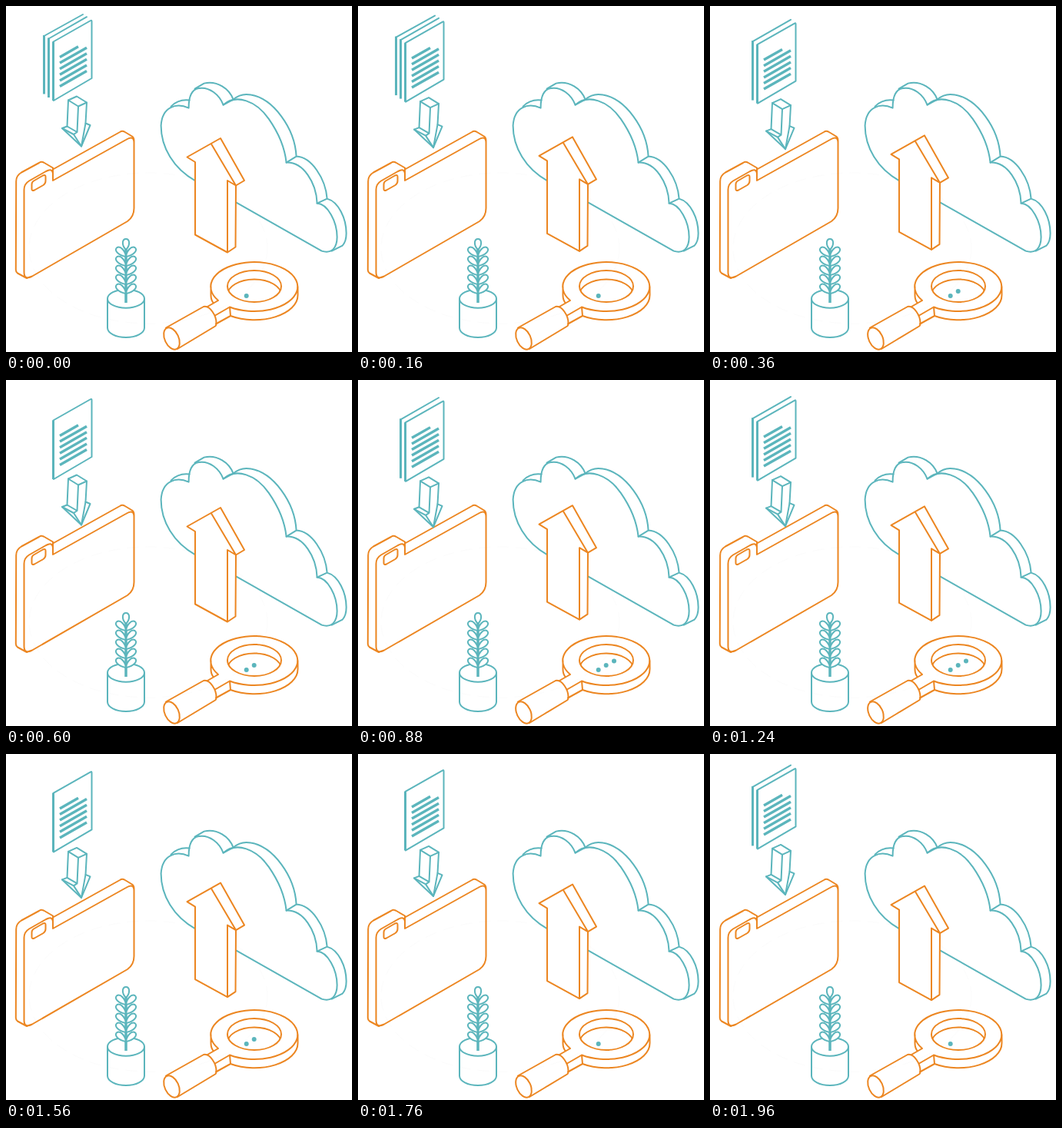
These frames come from a looping animation (450x450 px, 2000 ms). An HTML page:

```html
<!DOCTYPE html>
<html lang="en">
<head>
<meta charset="utf-8">
<title>Cloud upload</title>
<style>
  html, body { margin: 0; width: 100%; height: 100%; overflow: hidden; background: #fff; }
  svg { display: block; width: 100%; height: 100%; fill: none; stroke-width: 2; stroke-linejoin: round; stroke-linecap: round; }
  .teal { stroke: #5bb5bc; }
  .orange { stroke: #ec8621; }
  .solid { fill: #fff; }
  .thick { stroke-width: 3; stroke-linecap: butt; }
  .dot { fill: #5bb5bc; stroke: none; }
</style>
</head>
<body>
<svg viewBox="0 0 450 450">
  <defs>
    <clipPath id="lens"><ellipse cx="323" cy="364.5" rx="35" ry="20.5"/></clipPath>
  </defs>

  <ellipse cx="185" cy="315" rx="155" ry="98" stroke="#fcfcfc" stroke-width="1" stroke-dasharray="14 10"/>

  <!-- cloud -->
  <g class="teal" transform="translate(.6 .6)">
    <path d="M246 227C217 211 201 183 201 155C202.500 130 221 125 237 132C237 117 241 108 250 106.500C264 104 277 115 282 128C299 113 325 123 341 146C355 166 362 184 364 203C386 202 403 229 404 256C418 257 430 280 430 300C430 314 423 322 410 318L299 255"/>
    <path d="M214 130C221 123 230 121 238 122M245 107L257 100C274 96 290 107 295 121M282 128L295 121C302 115 309 113 318 115C347 120 375 158 377 195L364 203M377 195C397 196 415 224 417 250L404 256M417 250C432 254 442 276 442 295C442 303 440 308 437 311L423 318"/>
  </g>

  <!-- upload arrow -->
  <g id="up" class="orange">
    <path class="solid" d="M235.500 196.500L279 172L310 227L299 233.500L298.500 313.500L288 320.500L246 297.500V203Z"/>
    <path d="M267 179.500L299 233.500L288 227V320"/>
  </g>

  <!-- folder -->
  <g class="orange">
    <path d="M31 352.500L27 354L15 347.500Q12.800 346 12.800 343L13.200 228Q13.200 220.500 20 216.500L43 204Q46 202 49 203.500L61 210.500V227L156 174Q166.500 167.500 166.500 178M61 212.500L148 164Q151 162 154 163.500L164 169.500Q166.500 171 166.500 175V263Q166.500 274 158 280L34 351.500Q23.500 357 23.500 346V239Q23.500 231.500 30 227.500L52 215Q60.500 210.500 61 218"/>
    <path d="M36 227.500L48 220.500Q51.500 219 51.500 222V227.500Q51.500 231 48.500 233L37 239.500Q33.500 241 33.500 238V232Q33.500 229 36 227.500Z"/>
  </g>

  <!-- pages and small arrow -->
  <g id="down" class="teal">
    <g id="page3"><path d="M100 11L49.500 39"/><path class="thick" d="M49.500 38V114.500"/></g>
    <g id="page2"><path d="M105 14.200L55.500 42.500"/><path class="thick" d="M55.500 41.500V119"/></g>
    <path class="solid" d="M61.500 46.500L110 19Q111.500 18 111.500 20V94L62 123Z"/>
    <path class="thick" d="M61.500 46.500V123"/>
    <g id="text" stroke-width="3.400" stroke-linecap="butt"></g>
    <path class="solid" d="M81 122.500L92 117.500L105 125.500L103.500 152.500L109.500 155L98 182.500L73 159L79.500 156.500Z"/>
    <path d="M81 122.500L94 130.500L105 125.500M94 130.500L92.500 164L79.500 156.500M73 159L88 167L92.500 164M88 167L98 182.500L103.500 152.500"/>
  </g>

  <!-- plant -->
  <g class="teal">
    <path d="M132 381V418.500A24 12.500 0 0 0 180 418.500V381"/>
    <ellipse cx="156" cy="380.700" rx="24" ry="12"/>
    <path stroke-width="3.500" stroke-linecap="butt" d="M156 386V316"/>
    <path class="solid" d="M156 317C150 311 151 303 156 303C161 303 162 311 156 317Z"/>
    <g id="leaves"></g>
  </g>

  <!-- magnifier -->
  <g class="orange">
    <path d="M276 383A56.500 32 0 1 1 291 391.500L272 402.500M276 383L262 391M379.500 365V376A56.500 32 0 0 1 292 403L273 413.500M291 391.500L292 403M266.500 365V376Q266.500 382 269.500 386"/>
    <ellipse cx="323" cy="364.500" rx="35" ry="20.500"/>
    <ellipse cx="323" cy="376" rx="35" ry="20.500" clip-path="url(#lens)"/>
    <ellipse cx="215.500" cy="432.500" rx="9" ry="15" transform="rotate(-25 215.500 432.500)"/>
    <path d="M208 418.500L257 391C265 389 274 403 273.500 413Q273.500 415.500 272 416.500L223 446"/>
  </g>
  <circle class="dot" cx="312.700" cy="377" r="3"/>
  <circle class="dot" id="dot2" cx="322.700" cy="371" r="3"/>
  <circle class="dot" id="dot3" cx="333" cy="365.500" r="3"/>
</svg>
<script>
  const $ = id => document.getElementById(id);
  const show = (id, on) => $(id).setAttribute('visibility', on ? 'visible' : 'hidden');
  const shift = (id, y) => $(id).setAttribute('transform', `translate(0 ${y})`);

  $('text').innerHTML = [24, 35, 35, 35, 35, 35].map((w, i) =>
    `<path d="M70 ${66.5 + 7.6 * i}l${w} ${-w * 0.57}"/>`).join('');

  const leaf = 'M0 0C-1 -8 -7 -14 -11.500 -12C-16 -9 -11 -2 0 0Z';
  $('leaves').innerHTML = [326, 338, 350, 362, 374].map(y => [1, -1].map(side =>
    `<path class="solid" d="${leaf}" transform="translate(156 ${y}) scale(${side} 1)"/>`).join('')).join('');

  const LOOP = 2000, STEP = 40;

  function draw(now) {
    const t = Math.floor(now % LOOP / STEP) * STEP;
    const rise = 1 - Math.abs(t / 1000 - 1);   // linear, there and back
    shift('down', 10 * rise);
    shift('up', -10 * rise);

    const phase = t % 1000;                    // the stack runs twice per loop
    show('page3', phase < 220);
    show('page2', phase < 540 || phase >= 780);

    show('dot2', rise > 1 / 3);
    show('dot3', rise > 2 / 3);
  }

  const start = performance.now();
  function tick() {
    draw(performance.now() - start);
    requestAnimationFrame(tick);
  }
  tick();
</script>
</body>
</html>
```
